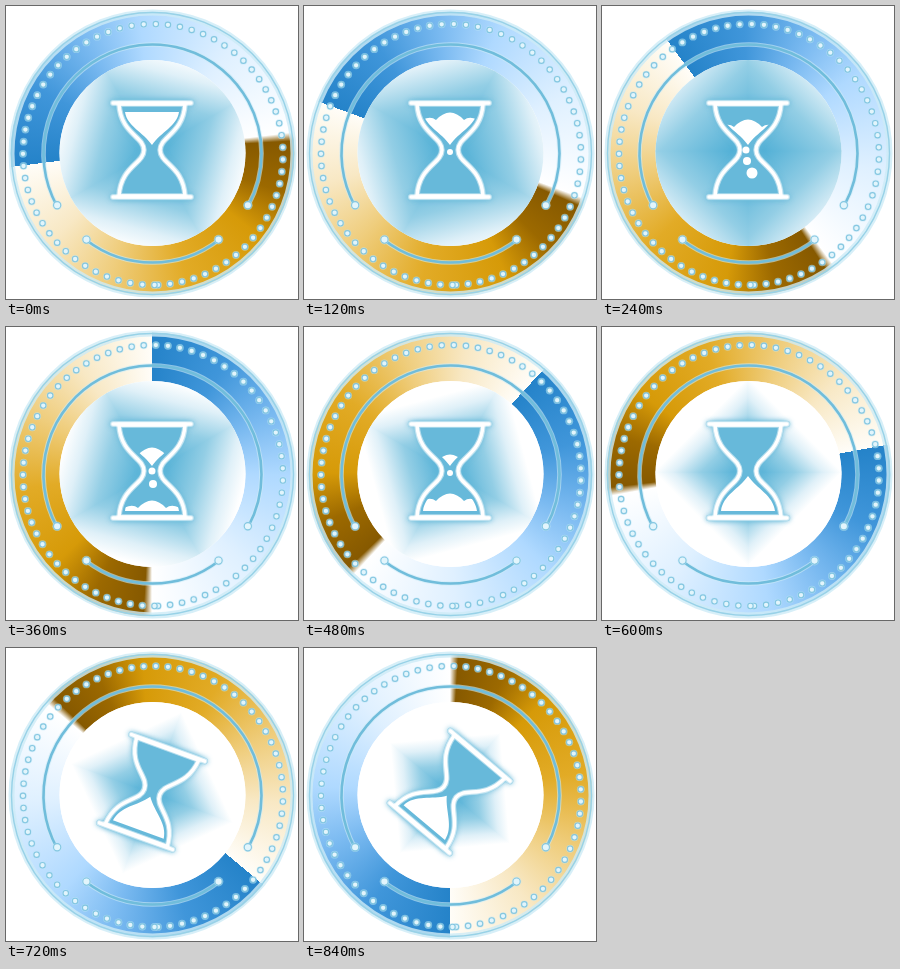
An HTML page with a canvas that plays this animation: 292 px wide and 293 px high, repeating every 960 ms.

```html
<!DOCTYPE html>
<html lang="en">
<head>
<meta charset="utf-8">
<title>Hourglass</title>
<style>
  html, body { margin: 0; width: 100%; height: 100%; overflow: hidden; background: #fff; }
  canvas { display: block; width: 292px; height: 293px; }
</style>
</head>
<body>
<canvas id="stage" width="292" height="293"></canvas>
<script>
const ctx = document.getElementById('stage').getContext('2d');
const TAU = Math.PI * 2, STEP = 120;
const CX = 146.5, CY = 147.5;
const BLUE = '#67b9da', LINE = '#70bddb';
const rad = deg => deg * Math.PI / 180;

// ring: where the blue half begins; glow: [reach, angle]; top/bottom: sand surface; drops: [x, y, r]
const poses = [
  { ring: 263, glow: [140, 60], turn: 0, top: -60, bottom: 60, drops: [] },
  { ring: 290, glow: [155, 30], turn: 0, top: -32, bottom: 60, drops: [[0, 2, 3]] },
  { ring: 323.5, glow: [175, 0], turn: 0, top: -25, bottom: 60, drops: [[-2, 0, 3.5], [-1, 11, 4], [4, 23, 5.5]] },
  { ring: 360, glow: [130, 60], turn: 0, top: -18, bottom: 35, drops: [[0, 0, 3.5], [1, 13, 4]] },
  { ring: 402.8, glow: [108, 30], turn: 0, top: -11, bottom: 28, drops: [[0, 2, 3]] },
  { ring: 439.5, glow: [94, 0], turn: 0, top: 0, bottom: 0, drops: [] },
  { ring: 490, glow: [86, 20], turn: 20, top: 0, bottom: 0, drops: [] },
  { ring: 540, glow: [78, 40], turn: 40, top: 0, bottom: 0, drops: [] }
];

function disc(x, y, r, fill) {
  ctx.beginPath();
  ctx.arc(x, y, r, 0, TAU);
  ctx.fillStyle = fill;
  ctx.fill();
}

function stroke(color, width) {
  ctx.strokeStyle = color;
  ctx.lineWidth = width;
  ctx.stroke();
}

function bead(x, y, r) {
  disc(x, y, r + 1.2, 'rgba(190,230,245,.55)');
  disc(x, y, r, '#e2f5fc');
  stroke('rgba(112,189,219,.8)', 1.1);
}

function drawRing(angle) {
  const fill = ctx.createConicGradient(rad(angle - 90), 146, 143.5);
  const stops = [
    [0, '#2583c9'], [35, '#4096da'], [65, '#79b9f0'], [92, '#afd9ff'], [135, '#dff0ff'], [180, '#fff'],
    [183.5, '#865900'], [205, '#9c6900'], [226, '#d69a08'], [262, '#e2ab26'], [295, '#efcd7c'],
    [325, '#f8e8c4'], [360, '#fffdf8']
  ];
  stops.forEach(([at, color]) => fill.addColorStop(at / 360, color));
  disc(CX, CY, 142, fill);
}

// Diamond gradient: four quadrants, each fading along its diagonal.
function drawGlow([reach, angle]) {
  disc(146.5, 147, 93, '#fff');
  ctx.save();
  ctx.clip();
  ctx.translate(146, 145);
  ctx.rotate(rad(angle));
  const fill = ctx.createLinearGradient(0, 0, reach / 2, reach / 2);
  fill.addColorStop(0, '#45aad3');
  fill.addColorStop(0.5, '#93cee5');
  fill.addColorStop(0.8, '#dff0f8');
  fill.addColorStop(1, '#fff');
  ctx.fillStyle = fill;
  for (let i = 0; i < 4; i++) {
    ctx.fillRect(-0.5, -0.5, 120, 120);
    ctx.rotate(TAU / 4);
  }
  ctx.restore();
}

function drawTrim() {
  ctx.beginPath();
  ctx.arc(CX, CY, 141, 0, TAU);
  stroke('rgba(205,236,247,.8)', 6);
  stroke('#98d2e7', 1.4);

  // The chain of dots starts and ends at the bottom, where two overlap.
  for (let i = 0; i < 68; i++) {
    const a = rad(177.8 - 5.35 * i);
    bead(147 + 130 * Math.sin(a), 148.5 - 130.5 * Math.cos(a), 2.7);
  }

  for (const [from, to] of [[151.5, 388.5], [52.5, 127.5]]) {
    ctx.beginPath();
    ctx.arc(CX, CY, 109, rad(from), rad(to));
    stroke('rgba(205,236,247,.6)', 4.6);
    stroke(LINE, 2.6);
    for (const end of [from, to]) {
      bead(CX + 108.5 * Math.cos(rad(end)), CY + 108.5 * Math.sin(rad(end)), 3.6);
    }
  }
}

const glass = new Path2D(`M-33-46C-31-16-8-14-8 0C-8 14-31 16-33 46
  H33C31 16 8 14 8 0C8-14 31-16 33-46Z`);
const plates = new Path2D('M-39-47H39M-39 47H39');
const topBulb = new Path2D('M-27-38H27C25-24 9-18 0-5C-9-18-25-24-27-38Z');
const bottomBulb = new Path2D('M-27 40H27C25 24 9 18 0 5C-9 18-25 24-27 40Z');

function drawSand(bulb, level) {
  ctx.save();
  ctx.clip(bulb);
  ctx.beginPath();
  ctx.moveTo(-30, level + 3);
  ctx.quadraticCurveTo(-20, level - 3, -14, level + 2);
  ctx.quadraticCurveTo(0, level - 13, 14, level + 2);
  ctx.quadraticCurveTo(20, level - 3, 30, level + 3);
  ctx.lineTo(30, 60);
  ctx.lineTo(-30, 60);
  ctx.fillStyle = '#fff';
  ctx.fill();
  ctx.restore();
}

function outline(color, width) {
  ctx.strokeStyle = color;
  ctx.lineWidth = width;
  ctx.stroke(glass);
  ctx.stroke(plates);
}

function drawHourglass({ turn, top, bottom, drops }) {
  ctx.save();
  ctx.translate(146, 144);
  ctx.rotate(rad(turn));
  ctx.lineCap = ctx.lineJoin = 'round';
  ctx.shadowColor = BLUE;
  ctx.shadowBlur = 5;
  outline('rgba(150,208,230,.8)', 6.5);
  ctx.shadowBlur = 0;
  ctx.fillStyle = BLUE;
  ctx.fill(glass);
  outline('rgba(255,255,255,.5)', 5.5);
  outline('#fff', 3.4);
  if (top < 0) drawSand(topBulb, top);
  if (bottom < 50) drawSand(bottomBulb, bottom);
  drops.forEach(([x, y, r]) => disc(x, y, r, '#fff'));
  ctx.restore();
}

function draw(pose) {
  ctx.fillStyle = '#fff';
  ctx.fillRect(0, 0, 292, 293);
  drawRing(pose.ring);
  drawGlow(pose.glow);
  drawTrim();
  drawHourglass(pose);
}

const start = performance.now();
let shown = -1;
function tick() {
  const index = Math.floor((performance.now() - start) / STEP) % poses.length;
  if (index !== shown) draw(poses[shown = index]);
  requestAnimationFrame(tick);
}
tick();
</script>
</body>
</html>
```
